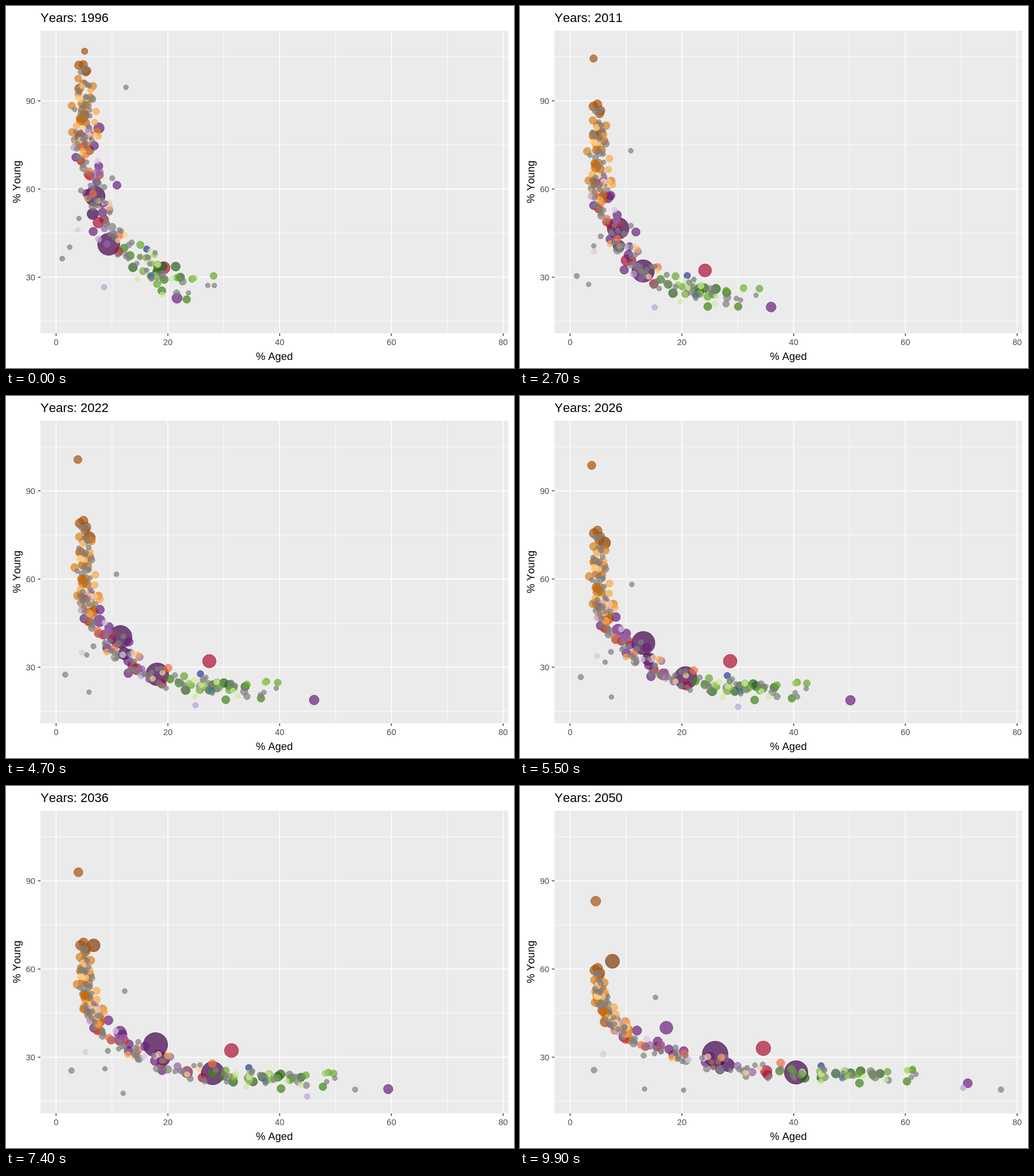
These frames come from a looping animation (885 by 632 pixels, 10000 ms). An HTML page:

```html
<!DOCTYPE html>
<html lang="en">
<head>
<meta charset="utf-8">
<title>Young and aged shares</title>
<style>
  html, body { margin: 0; width: 100%; height: 100%; overflow: hidden; background: #fff; }
  svg { display: block; width: 885px; height: 632px; font-family: "Liberation Sans", Arial, sans-serif; font-kerning: none; }
  .tick { font-size: 14.67px; fill: #4d4d4d; }
  .axis { font-size: 18.33px; }
  .title { font-size: 22px; }
  circle { fill-opacity: .7; stroke-opacity: .7; stroke-width: .9; }
</style>
</head>
<body>
<svg id="stage" viewBox="0 0 885 632"></svg>
<script>
const STEP = 100, STEPS = 100, FIRST_YEAR = 1996, SPAN = 54;
const GREY = '#7f7f7f', PLUM = '#40004b', PURPLE = '#6a1f7c', CRIMSON = '#ae0f35', PALE = '#dcc8e4';

const px = aged => 87.3 + aged * 9.735;
const py = young => 627.5 - young * 5.133;
const mix = (a, b, p) => a + (b - a) * p;

let seed = 1996;
function rand() {
  seed = seed + 0x6D2B79F5 | 0;
  let v = Math.imul(seed ^ seed >>> 15, 1 | seed);
  v = v + Math.imul(v ^ v >>> 7, 61 | v) ^ v;
  return ((v ^ v >>> 14) >>> 0) / 4294967296;
}
const spread = () => rand() + rand() + rand() - 1.5;

// Standouts: colour, radius from and to, then start, middle and end points.
const standouts = [
  [PLUM, 19.3, 20.5, 179, 416, 271, 488, 481, 500],
  [PLUM, 17.6, 22.4, 155, 332, 204, 424, 340, 468],
  [CRIMSON, 10.8, 12.8, 275, 457, 358, 463, 424, 458],
  [PLUM, 9.8, 11.5, 151, 363, 211, 453, 362, 487],
  [PURPLE, 9.2, 11.3, 162, 213, 165, 398, 255, 422],
  ['#7f3b08', 8, 12.4, 137, 190, 146, 250, 161, 306],
  [CRIMSON, 9.6, 10, 161, 378, 234, 480, 429, 498],
  [GREY, 9.4, 7, 263, 469, 346, 508, 524, 500],
  [PURPLE, 9, 8, 298, 510, 549, 531, 780, 519],
  ['#a85208', 5.7, 8.7, 137, 79, 125, 114, 132, 201],
  [GREY, 4.2, 5, 363, 488, 455, 523, 838, 530],
  [GREY, 4.5, 5.3, 98, 441, 104, 488, 129, 496],
  [GREY, 4.3, 4.4, 209, 142, 193, 317, 236, 369],
  [GREY, 4.2, 4.2, 111, 421, 149, 520, 285, 531],
  [GREY, 4.2, 4.2, 127, 371, 143, 456, 217, 529],
  [PALE, 4.5, 5.3, 125, 391, 133, 450, 145, 468],
  ['#bf9fd2', 5, 5, 171, 491, 345, 541, 772, 527]
];

// Crowd groups: size, stretch of the ridge, growth, colours from small to large.
const groups = [
  { n: 44, from: 0, to: .37, grow: 1.2, ramp: ['#fdd08c', '#fba848', '#dd8018', '#c96a08', '#a85208'] },
  { n: 24, from: .2, to: .76, grow: .7, ramp: [PALE, '#bf9fd2', '#9163ac', PURPLE, PURPLE] },
  { n: 18, from: .25, to: .8, grow: .4, ramp: ['#fdd08c', '#fba848', '#f46d43', '#d7301f', CRIMSON] },
  { n: 32, from: .78, to: 1, grow: .1, ramp: ['#cfeba0', '#9bcf55', '#66a82c', '#3f8415', '#276419'] },
  { n: 2, from: .83, to: .93, grow: 0, ramp: ['#3a6cb0', '#2b3a98'] },
  { n: 80, from: 0, to: 1, grow: .2, ramp: [GREY] }
];

// Shares of aged and young at quantile u and progress p.
function ridge(u, p) {
  const aged = 5 + (20 + 20 * p + 17 * p * p) * u ** (3.5 - 1.3 * p);
  const bend = 1.1 + 2 * p - .9 * p * p;
  const young = 26 - 12 * p + 10 * p * p + (74 - 39 * p) * (1 - u) ** bend;
  return [px(aged), py(young)];
}

// Parabola through three values at p = 0, 1/2 and 1.
const arc = (a, b, c, p) => a + 2 * (b - a) * p + 2 * (a - 2 * b + c) * p * (p - .5);

function standout([color, r0, r1, x0, y0, x1, y1, x2, y2]) {
  return { color, r0, r1, at: p => [arc(x0, x1, x2, p), arc(y0, y1, y2, p)] };
}

function member({ n, from, to, grow, ramp }, i) {
  const u = mix(from, to, (i + rand()) / n);
  const dx = spread(), dy = spread();
  const rank = Math.floor(rand() * ramp.length);
  const r = ramp.length > 1 ? 4.5 + rank * .7 + rand() * .8 : 4.1 + 2.8 * rand() ** 3;
  return {
    color: ramp[rank], r0: r, r1: r + grow,
    at(p) {
      const [x, y] = ridge(u, p);
      return [x + dx * mix(16, 10, p) * (1 + 1.6 * u), y + dy * mix(23, 13, p)];
    }
  };
}

const crowd = groups.flatMap(g => Array.from({ length: g.n }, (_, i) => member(g, i)));
const dots = [...standouts.map(standout), ...crowd].sort((a, b) => b.r0 - a.r0);

const stage = document.getElementById('stage');
function add(tag, attrs, text) {
  const el = document.createElementNS('http://www.w3.org/2000/svg', tag);
  for (const name in attrs) el.setAttribute(name, attrs[name]);
  if (text !== undefined) el.textContent = text;
  return stage.appendChild(el);
}
const line = (x1, y1, x2, y2, stroke, w) => add('line', { x1, y1, x2, y2, stroke, 'stroke-width': w });
const label = (cls, x, y, anchor, text) => add('text', { class: cls, x, y, 'text-anchor': anchor }, text);

add('rect', { x: 60, y: 43, width: 815, height: 528.5, fill: '#ebebeb' });
for (let v = 10; v < 80; v += 20) line(px(v), 43, px(v), 571.5, '#fff', .8);
for (let v = 15; v < 110; v += 30) line(60, py(v), 875, py(v), '#fff', .8);
for (let v = 0; v <= 80; v += 20) {
  line(px(v), 43, px(v), 571.5, '#fff', 1.5);
  line(px(v), 571.5, px(v), 576, '#333', 1.4);
  label('tick', px(v), 592.2, 'middle', v);
}
for (let v = 30; v <= 90; v += 30) {
  line(60, py(v), 875, py(v), '#fff', 1.5);
  line(55.5, py(v), 60, py(v), '#333', 1.4);
  label('tick', 51, py(v) + 5.5, 'end', v);
}
label('axis', 467.5, 618, 'middle', '% Aged');
label('axis', 0, 0, 'middle', '% Young').setAttribute('transform', 'translate(25 307) rotate(-90)');
const title = label('title', 60, 28, 'start', '');

for (const d of dots) d.el = add('circle', { fill: d.color, stroke: d.color });

function draw(p) {
  title.textContent = 'Years: ' + Math.round(FIRST_YEAR + SPAN * p);
  for (const d of dots) {
    const [x, y] = d.at(p);
    d.el.setAttribute('cx', x.toFixed(2));
    d.el.setAttribute('cy', y.toFixed(2));
    d.el.setAttribute('r', mix(d.r0, d.r1, p).toFixed(2));
  }
}

const start = performance.now();
let shown = -1;
function tick() {
  const k = Math.floor(Math.max(0, performance.now() - start) / STEP) % STEPS;
  if (k !== shown) draw((shown = k) / (STEPS - 1));
  requestAnimationFrame(tick);
}
tick();
</script>
</body>
</html>
```
